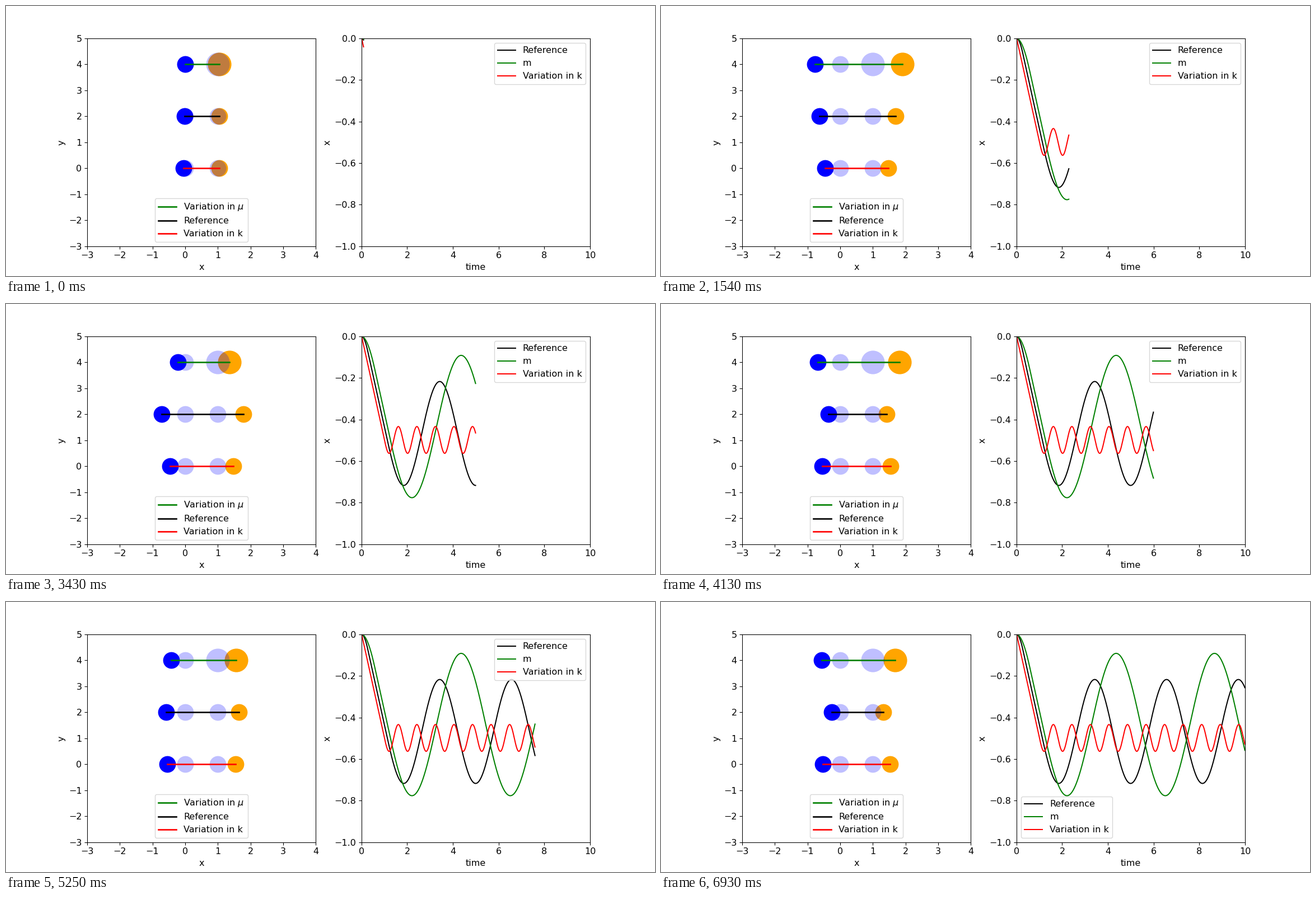
Animation, 1159 px wide and 483 px high, one loop 7 s. Source, as a matplotlib script:

```python
import numpy as np
import matplotlib.pyplot as plt
from matplotlib.animation import FuncAnimation

DPI = 96
FRAMES, INTERVAL = 100, 70
STEPS = 10          # time samples added per frame
V = 0.5             # speed of each outward-moving belt
T = np.arange(FRAMES * STEPS) * 0.01

plt.rcParams.update({"font.family": "DejaVu Sans", "font.size": 12})


def stick_slip(t, kappa):
    """Two equal blocks joined by a spring on belts moving apart.

    The right block starts at belt speed, the left one at rest. Slip lasts
    until the left block catches its belt, then both stick until the spring
    is stretched by one unit, then they swing freely about that stretch.
    kappa is stiffness over mass.
    """
    q = np.sqrt(kappa)
    catch = (np.arcsin(2 * V / np.hypot(q, V)) - np.arctan2(V, q)) / q

    def slip(s):
        return 1 - np.cos(q * s) + V / q * np.sin(q * s)

    release = catch + (1 - slip(catch)) / (2 * V)
    w = np.sqrt(2 * kappa)
    swing = V / w * np.sin(w * (t - release))

    right = np.where(t < release, 1 + V * t, 1 + V * release + swing)
    stretch = np.where(t < catch, slip(t), slip(catch) + 2 * V * (t - catch))
    stretch = np.where(t < release, stretch, 1 + 2 * swing)
    return right - 1 - stretch, right


# label on the left, colour, height, kappa, area of the right ball
SYSTEMS = [
    (r"Variation in $\mu$", "green", 4, 16 / 15, 1000),
    ("Reference", "black", 2, 2, 500),
    ("Variation in k", "red", 0, 30, 500),
]

fig, (ax, graph) = plt.subplots(1, 2, figsize=(1159 / DPI, 483 / DPI), dpi=DPI)

ax.set(xlim=(-3, 4), ylim=(-3, 5), xlabel="x", ylabel="y",
       xticks=range(-3, 5), yticks=range(-3, 6))
graph.set(xlim=(0, 10), ylim=(-1, 0), xlabel="time", ylabel="x",
          xticks=range(0, 11, 2), yticks=np.linspace(-1, 0, 6))


def ball(x, y, size, color, alpha=1):
    return ax.scatter([x], [y], s=size, color=color, alpha=alpha, linewidths=0)


blocks = []
for label, color, y, kappa, size in SYSTEMS:
    left, right = stick_slip(T, kappa)
    balls = ball(0, y, 500, "blue"), ball(1, y, size, "orange")
    ball(0, y, 500, "blue", 0.25)
    ball(1, y, size, "blue", 0.25)
    rod, = ax.plot([], [], color=color, lw=2, label=label)
    blocks.append((y, left, right, balls, rod))
ax.legend(loc="lower center")

curves = []
for k, label in ((1, "Reference"), (0, "m"), (2, "Variation in k")):
    curve, = graph.plot([], [], color=SYSTEMS[k][1], lw=1.5, label=label)
    curves.append((curve, blocks[k][1]))
key = graph.legend(loc="upper right")


def update(i):
    n = (i + 1) * STEPS
    for y, left, right, (blue, orange), rod in blocks:
        a, b = left[n - 1], right[n - 1]
        blue.set_offsets([[a, y]])
        orange.set_offsets([[b, y]])
        rod.set_data([a, b], [y, y])
    for curve, x in curves:
        curve.set_data(T[:n], x[:n])
    # the key steps aside once the green curve reaches it
    key.set_loc("upper right" if T[n - 1] < 8.05 else "lower left")
    return []


def init():
    return update(0)


anim = FuncAnimation(fig, update, frames=FRAMES, init_func=init,
                     interval=INTERVAL, repeat=True, repeat_delay=0, blit=False)
plt.show()
```
